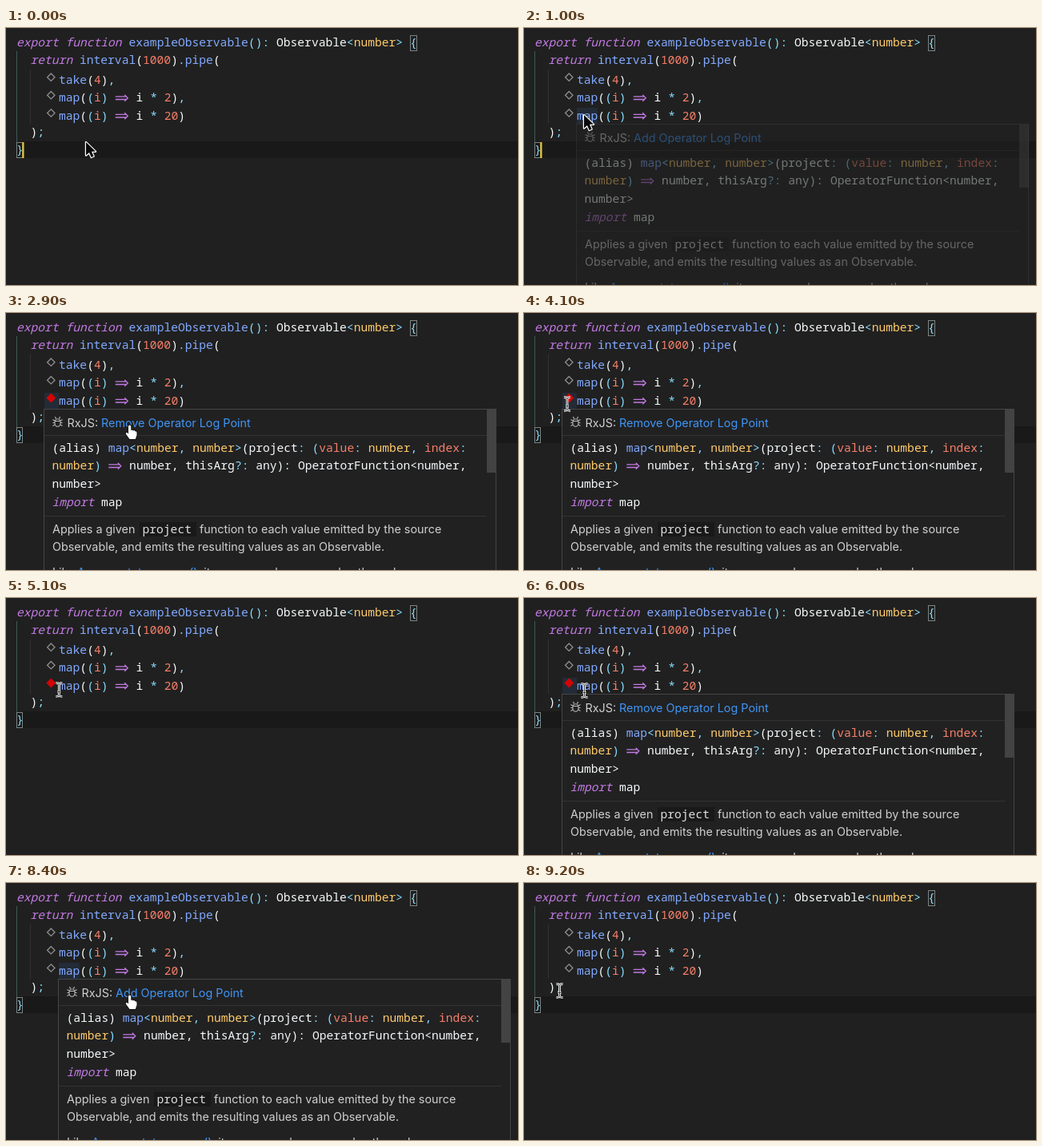
These frames come from a looping animation (640 px wide and 322 px high, 9.5 s). An HTML page with a canvas:

```html
<!DOCTYPE html>
<html lang="en">
<head>
<meta charset="utf-8">
<title>Operator log point</title>
<style>
  html, body { margin: 0; height: 100%; overflow: hidden; background: #202020; }
  canvas { display: block; }
</style>
</head>
<body>
<canvas id="stage" width="640" height="322"></canvas>
<script>
const ctx = document.getElementById('stage').getContext('2d');
const LOOP = 9500, STEP = 100;
const CELL = 8.784;
const MONO = '500 14.64px "Noto Sans Mono", monospace';
const SANS = '14.36px Inter, sans-serif';

// Colour keys used in the code markup: "~k" switches to key k.
const COLORS = {
  k: '#c27ae3', f: '#82aaff', c: '#89ddff', w: '#f6f9fa',
  t: '#ffcb6b', n: '#f57f68', a: '#c27ae3'
};

const rect = (color, x, y, w, h) => {
  ctx.fillStyle = color;
  ctx.fillRect(x, y, w, h);
};

function text(str, x, y, color, font = SANS) {
  ctx.font = font;
  ctx.fillStyle = color;
  ctx.fillText(str, x, y);
}

function arrowGlyph(x, y) {
  ctx.strokeStyle = COLORS.a;
  ctx.lineWidth = 1.3;
  ctx.beginPath();
  for (const dy of [-1.8, 1.8]) {
    ctx.moveTo(x + .5, y + dy);
    ctx.lineTo(x + 14, y + dy);
  }
  ctx.moveTo(x + 12, y - 4);
  ctx.lineTo(x + 16, y);
  ctx.lineTo(x + 12, y + 4);
  ctx.stroke();
}

function code(markup, x, y) {
  const parts = markup.split(/~(\w)/).slice(1);
  for (let i = 0; i < parts.length; i += 2) {
    const [key, str] = [parts[i], parts[i + 1]];
    if (key === 'a') arrowGlyph(x, y - 4.3);
    else text(str, x, y, COLORS[key], (key === 'k' ? 'italic ' : '') + MONO);
    x += str.length * CELL;
  }
}

function diamond(x, y, filled) {
  const r = filled ? 6 : 4.7;
  ctx.beginPath();
  ctx.moveTo(x, y - r);
  ctx.lineTo(x + r, y);
  ctx.lineTo(x, y + r);
  ctx.lineTo(x - r, y);
  ctx.closePath();
  if (filled) {
    ctx.fillStyle = '#d40505';
    ctx.fill();
  } else {
    ctx.strokeStyle = '#8f8f8f';
    ctx.lineWidth = 1.3;
    ctx.stroke();
  }
}

function frameBox(x, y, w, h, color) {
  ctx.strokeStyle = color;
  ctx.lineWidth = 1;
  ctx.strokeRect(x + .5, y + .5, w, h);
}

function editor(logging, hovered, caret) {
  rect('#202020', 0, 0, 640, 322);
  rect('#191919', 13, 142, 627, 21);
  rect('#3c5955', 13, 29, 1, 114);
  rect('#323232', 30, 52, 1, 68);
  if (hovered) {
    const [left, width] = logging ? [48, 18] : [66, 26];
    rect('rgba(45,85,135,.22)', left, 100, width, 20);
  }
  frameBox(505, 9, 8, 19, '#7c8583');
  frameBox(13, 143, 7, 19, '#7c8583');

  code('~kexport function ~fexampleObservable~c(): ~wObservable~c<~tnumber~c> {', 13, 22.5);
  code('~kreturn ~finterval~w(~n1000~w)~c.~fpipe~w(', 30.5, 45);
  code('~ftake~w(~n4~w)~c,', 66, 69.5);
  code('~fmap~w(~c(~ni~c) ~a=>~w i ~c* ~n2~w)~c,', 66, 92);
  code('~fmap~w(~c(~ni~c) ~a=>~w i ~c* ~n20~w)', 66, 114.5);
  code('~w)~c;', 30.5, 135);
  code('~c}', 13, 157);
  diamond(56.3, 61.7, false);
  diamond(56.3, 84.2, false);
  diamond(56.3, 106.5, logging);
  if (caret) rect('#f5c518', 20.5, 143, 2, 20);
}

function bugIcon(x, y) {
  ctx.strokeStyle = '#bdbdbd';
  ctx.lineWidth = 1.1;
  ctx.beginPath();
  ctx.ellipse(x, y + 1, 3.6, 4.8, 0, 0, 2 * Math.PI);
  ctx.moveTo(x - 3.5, y - 1);
  ctx.lineTo(x + 3.5, y - 1);
  for (const side of [-1, 1]) {
    for (const dy of [-4, 0, 4]) {
      ctx.moveTo(x + side * 3.5, y + 1 + dy * .6);
      ctx.lineTo(x + side * 6, y + 1 + dy);
    }
    ctx.moveTo(x + side * 2, y - 4);
    ctx.lineTo(x + side * 3, y - 6.5);
  }
  ctx.stroke();
}

function popup(logging, alpha) {
  const grey = '#d0d0d0', link = '#4096f5';
  ctx.save();
  ctx.globalAlpha = alpha;
  ctx.translate(logging ? -18 : 0, 0);
  rect('#212122', 66, 120, 565, 210);
  frameBox(65, 120, 565, 210, '#454545');
  rect('#333333', 66, 153, 553, 1);
  rect('#333333', 66, 254, 553, 1);
  rect('#434343', 619, 121, 12, 79);

  bugIcon(82.5, 136.5);
  text('RxJS:', 94.5, 142.5, grey);
  text((logging ? 'Remove' : 'Add') + ' Operator Log Point', 137, 142.5, link);

  code('~w(alias) ~fmap~c<~tnumber~c, ~tnumber~c>~w(project~c: (~nvalue~c: ~tnumber~c, ~nindex~c:', 75.5, 174);
  code('~tnumber~c) ~a=>~w number, thisArg~c?: ~wany): OperatorFunction<number,', 75.5, 196);
  code('~wnumber>', 75.5, 219);
  code('~kimport ~wmap', 75.5, 241.5);

  text('Applies a given', 76, 275.5, grey);
  rect('#191919', 185, 262, 71, 18);
  text('project', 188.5, 275.5, '#e0e0e0', MONO);
  text('function to each value emitted by the source', 260, 275.5, grey);
  text('Observable, and emits the resulting values as an Observable.', 76, 298.3, grey);
  text('Like', 76, 329.5, grey);
  text('Array.prototype.map()', 107, 329.5, link);
  text(', it passes each source value through', 257, 329.5, grey);
  ctx.restore();
}

// Pointer shapes, with the hot spot at the origin.
const POINTERS = {
  arrow: new Path2D('M0 0V16.5L4 13L6.6 19L9.6 17.7L7 11.8H12Z'),
  beam: new Path2D('M-4 -8.5Q-1 -8.5 0 -7Q1 -8.5 4 -8.5M-4 8.5Q-1 8.5 0 7Q1 8.5 4 8.5M0 -7V7M-2 2.5H2'),
  hand: new Path2D('M-2 1Q-2 -.6 -.5 -.6Q1 -.6 1.2 1V6Q2.6 4.8 3.8 6.4Q5.4 5.5 6.4 7.2Q8.6 6.8 8.5 9V12L6.8 17H-.5L-5.2 10.5Q-5.6 8.2 -3.6 8.8L-2 10.4Z')
};

function pointer({ x, y, shape }) {
  const stroke = (color, width) => {
    ctx.strokeStyle = color;
    ctx.lineWidth = width;
    ctx.stroke(POINTERS[shape]);
  };
  ctx.save();
  ctx.translate(x, y);
  ctx.lineJoin = 'round';
  if (shape === 'beam') {
    stroke('#f4f4f4', 2.8);
    stroke('#222', .8);
  } else {
    const isArrow = shape === 'arrow';
    stroke(isArrow ? '#fff' : '#111', isArrow ? 2.4 : 1.8);
    ctx.fillStyle = isArrow ? '#0a0a0a' : '#fff';
    ctx.fill(POINTERS[shape]);
  }
  ctx.restore();
}

// Pointer route: time, x, y.
const ROUTE = [
  [0, 100, 143], [800, 75, 109], [1400, 75, 109], [2200, 132.5, 138],
  [2500, 155, 141], [3000, 155, 141], [3900, 54, 114], [4100, 54, 114],
  [4500, 40, 112], [4700, 40, 112], [5300, 75.5, 116], [6000, 75.5, 116],
  [6700, 155, 141], [8600, 155, 141], [9200, 44.5, 135], [LOOP, 44.5, 135]
];

function pointerAt(t) {
  const i = ROUTE.findIndex(stop => stop[0] > t);
  const [t0, x0, y0] = ROUTE[i - 1], [t1, x1, y1] = ROUTE[i];
  const p = (t - t0) / (t1 - t0), e = p * p * (3 - 2 * p);
  const x = x0 + (x1 - x0) * e, y = y0 + (y1 - y0) * e;
  const onLink = x > 134 && y > 130;
  const shape = t <= 2200 ? 'arrow' : onLink ? 'hand' : 'beam';
  return { x, y, shape };
}

const ramp = (t, start, length) => Math.min(1, Math.max(0, (t - start) / length));

function popupAlpha(t) {
  if (t < 4300) return ramp(t, 940, 150);
  if (t < 8900) return ramp(t, 5240, 150);
  return 0;
}

function draw(now) {
  const t = Math.floor(now % LOOP / STEP) * STEP;
  const logging = t >= 2700 && t < 8000;
  const caret = t < 2700 && (t + 400) % 1000 < 500;
  const alpha = popupAlpha(t);
  editor(logging, alpha > 0, caret);
  if (alpha) popup(logging, alpha);
  pointer(pointerAt(t));
}

const start = performance.now();
function tick() {
  draw(performance.now() - start);
  requestAnimationFrame(tick);
}
tick();
</script>
</body>
</html>
```
